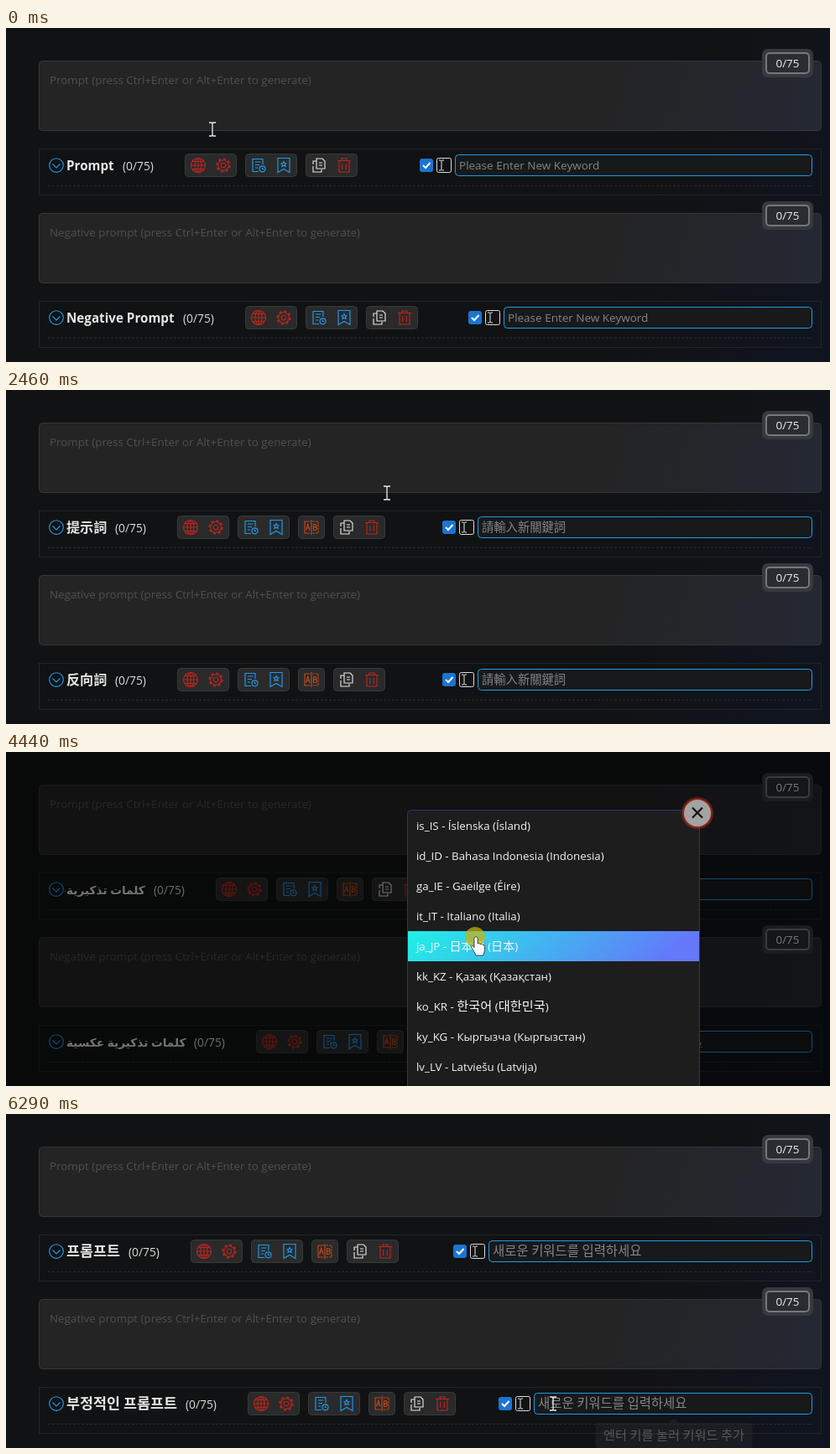
Animation of 982 by 399 pixels, one loop 6.79 s. Source, as an HTML page:

```html
<!DOCTYPE html>
<html lang="en">
<head>
<meta charset="utf-8">
<style>
  html, body { margin: 0; height: 100%; overflow: hidden; background: #111213; }
  svg { display: block; width: 982px; height: 399px; }
  text { font-family: "Open Sans", "Noto Sans", "Noto Sans CJK SC", "DejaVu Sans", sans-serif; white-space: pre; }
  .line { fill: none; stroke: currentColor; stroke-width: 1.15; }
  .red { color: #bd251d; }
  .blue { color: #1e9bea; }
  .orange { color: #c0471c; }
  .white { color: #e4e4e4; }
</style>
</head>
<body>
<svg viewBox="0 0 982 399">
  <defs>
    <linearGradient id="glow" gradientUnits="userSpaceOnUse" x1="770" y1="150" x2="1000" y2="235">
      <stop offset="0" stop-color="#0c1a40" stop-opacity="0"/>
      <stop offset="1" stop-color="#0c1a40" stop-opacity=".27"/>
    </linearGradient>
    <linearGradient id="field" gradientUnits="userSpaceOnUse" x1="720" y1="0" x2="972" y2="60">
      <stop offset="0" stop-color="#242424"/>
      <stop offset="1" stop-color="#242832"/>
    </linearGradient>
    <linearGradient id="active" gradientUnits="userSpaceOnUse" x1="570" y1="-85" x2="735" y2="85">
      <stop offset="0" stop-color="#20f0e6"/>
      <stop offset="1" stop-color="#6478fa"/>
    </linearGradient>
    <radialGradient id="halo">
      <stop offset=".8" stop-color="#c02a18" stop-opacity=".9"/>
      <stop offset="1" stop-color="#c02a18" stop-opacity="0"/>
    </radialGradient>
    <g id="globe" class="line">
      <circle r="8.5"/><ellipse rx="4" ry="8.5"/>
      <path d="M-8.5 0H8.5M0-8.5V8.5M-7.2-4.5H7.2M-7.2 4.5H7.2"/>
    </g>
    <g id="gear" class="line">
      <circle r="2.8"/><circle r="6.3"/>
      <circle r="7.7" stroke-width="1.8" stroke-dasharray="3.02"/>
    </g>
    <g id="history" class="line">
      <path d="M5-1V-7.5H-7V7.5H0M-4-4H2.5M-4-.5H1M-4 3H-1M4.5 2.5V4.5H6"/>
      <circle cx="4.5" cy="4.3" r="3.5"/>
    </g>
    <g id="bookmark" class="line">
      <path d="M-7 8.5V-8.5H7V8.5L0 4.5Z"/>
      <path d="M0-4.5L1-2.5 3-2.2 1.5-.8 2 1.3 0 .2-2 1.3-1.5-.8-3-2.2-1-2.5Z"/>
    </g>
    <g id="compare" class="line">
      <path d="M-1.5-7H-8V7H-1.5M0-9V9"/>
      <path d="M1.5-7H8V7H1.5" stroke-dasharray="2.5 1"/>
      <path d="M-6.5 3.5L-4.3-3.5-2 3.5M-5.7 1H-2.8M2.5-3.5V3.5H4.5A1.8 1.8 0 0 0 4.5-.2H2.5M4.3-.2A1.6 1.6 0 0 0 4.3-3.5H2.5"/>
    </g>
    <g id="copy" class="line">
      <path d="M-3-8H4L7-5V4H-3ZM-3-5H-7V-1M-7 1V8H3V5M0-3H4M0 0H4"/>
    </g>
    <g id="trash" class="line">
      <path d="M-8-5.5H8M-3-5.5V-8H3V-5.5M-6-5.5V8H6V-5.5M-2.3-2V5M2.3-2V5"/>
    </g>
    <path id="beam" d="M-4-8H-1L0-7 1-8H4M0-7V7M-4 8H-1L0 7 1 8H4" fill="none" stroke="#eee" stroke-width="1.3"/>
    <path id="hand" d="M-2 1Q0-2 2 1V8Q3.5 6.5 5 8.5 7 7.5 8 9.5 10.5 8.5 10.5 11V15Q10.5 18 8.5 22H0Q-1 18.5-4.5 14-6.5 11-4.5 10.5-3 10.5-2 12.5Z" fill="#fff" stroke="#222" stroke-width=".8"/>
  </defs>
  <rect width="982" height="399" fill="#111213"/>
  <rect width="982" height="399" fill="url(#glow)"/>
  <g id="scene"></g>
</svg>
<script>
const LOOP = 6790, STEP = 70, ROW = 36, TOP = 70;

const locales = `zh_CN - 简体中文 (中国)|zh_HK - 繁體中文 (中國香港)|zh_TW - 繁体中文 (中國台灣)
en_US - English (US)|af_ZA - Afrikaans (South Africa)|sq_AL - Shqip (Shqipëria)|am_ET - አማርኛ (ኢትዮጵያ)
ar_SA - العربية (السعودية)|hy_AM - Հայերեն (Հայաստան)|az_AZ - Azərbaycan (Azərbaycan)
bs_BA - Bosanski (Bosna i Hercegovina)|bg_BG - Български (България)|ca_ES - Català (Espanya)
hr_HR - Hrvatski (Hrvatska)|cs_CZ - Čeština (Česko)|da_DK - Dansk (Danmark)|nl_NL - Nederlands (Nederland)
et_EE - Eesti (Eesti)|fi_FI - Suomi (Suomi)|fr_FR - Français (France)|de_DE - Deutsch (Deutschland)
el_GR - Ελληνικά (Ελλάδα)|hu_HU - Magyar (Magyarország)|is_IS - Íslenska (Ísland)
id_ID - Bahasa Indonesia (Indonesia)|ga_IE - Gaeilge (Éire)|it_IT - Italiano (Italia)|ja_JP - 日本語 (日本)
kk_KZ - Қазақ (Қазақстан)|ko_KR - 한국어 (대한민국)|ky_KG - Кыргызча (Кыргызстан)|lv_LV - Latviešu (Latvija)
lt_LT - Lietuvių (Lietuva)|mk_MK - Македонски (Македонија)`.split(/[|\n]/);
const indexOf = code => locales.findIndex(name => name.startsWith(code));
const FAR = indexOf('ja_JP') - 4;

// bars: left edge of the two toolbars; tip: width of the language tooltip
const ui = {
  en_US: { titles: ['Prompt', 'Negative Prompt'], hint: 'Please Enter New Keyword', bars: [213, 285], tip: 166 },
  zh_CN: { titles: ['提示词', '反向词'], hint: '请输入新关键词', bars: [204, 204], tip: 182 },
  zh_HK: { titles: ['提示詞', '反向詞'], hint: '請輸入新關鍵詞', bars: [204, 204], tip: 210 },
  ar_SA: { titles: ['كلمات تذكيرية', 'كلمات تذكيرية عكسية'], hint: 'يرجى إدخال كلمة مفتاحية جديدة', bars: [250, 298], tip: 190, titleSize: 13 },
  ja_JP: { titles: ['プロンプト', 'ネガティブなプロンプト'], hint: '新しいキーワードを入力してください', bars: [236, 332], tip: 168 },
  ko_KR: { titles: ['프롬프트', '부정적인 프롬프트'], hint: '새로운 키워드를 입력하세요', bars: [220, 288] }
};

// each visit: press the globe, walk to a list entry, click it, rest
const visits = [
  { press: 340, pick: 620, done: 1120, from: 'en_US', to: 'zh_CN', globe: [229, 160], x: 560, rest: [400, 122], scroll: [0, 0] },
  { press: 1620, pick: 1960, done: 2460, from: 'zh_CN', to: 'zh_HK', globe: [230, 154], x: 560, rest: [454, 123], scroll: [0, 0] },
  { press: 2960, pick: 3170, done: 3670, from: 'zh_HK', to: 'ar_SA', globe: [222, 160], x: 560, rest: [420, 122], scroll: [0, 0] },
  { press: 4170, pick: 4440, done: 4940, from: 'ar_SA', to: 'ja_JP', globe: [267, 163], x: 560, rest: [440, 122], scroll: [0, FAR] },
  { press: 5440, pick: 5790, done: 6290, from: 'ja_JP', to: 'ko_KR', globe: [256, 168], x: 560, rest: [652, 346], scroll: [FAR, FAR] }
];

const mix = (a, b, p) => a + (b - a) * p;
const at = (x, y, body) => `<g transform="translate(${x} ${y})">${body}</g>`;
const icon = (id, x, y, tone = '') => `<use href="#${id}" x="${x}" y="${y}" class="${tone}"/>`;
const box = (x, y, w, h, fill, stroke = 'none', r = 4, more = '') =>
  `<rect x="${x}" y="${y}" width="${w}" height="${h}" rx="${r}" fill="${fill}" stroke="${stroke}" ${more}/>`;

// other scripts are set slightly larger than Latin
const scaled = s => s
  .replace(/[\u3040-\u30ff\u4e00-\u9fff]+/g, '<tspan font-size="1.06em">$&</tspan>')
  .replace(/[\u0600-\u06ff]+( [\u0600-\u06ff]+)*/g, '<tspan font-size="1.055em">$&</tspan>')
  .replace(/[\uac00-\ud7af]+/g, '<tspan font-size="1.145em">$&</tspan>');
const text = (x, y, s, fill, size = 13.4, more = '') =>
  `<text x="${x}" y="${y}" fill="${fill}" font-size="${size}" ${more}>${scaled(s)}</text>`;

function toolbar(x, english) {
  const group = (dx, ...icons) => box(x + dx + .5, 150.5, icons.length * 30 + 1, 27, '#2a2a2b', '#38393a') +
    icons.map(([id, tone], i) => icon(id, x + dx + 16 + i * 30, 164, tone)).join('');
  return group(0, ['globe', 'red'], ['gear', 'red']) +
    group(72, ['history', 'blue'], ['bookmark', 'blue']) +
    (english ? '' : group(144, ['compare', 'orange'])) +
    group(english ? 144 : 186, ['copy', 'white'], ['trash', 'red']);
}

function panel(code, i) {
  const { titles, hint, bars, titleSize = 15.2 } = ui[code];
  const x = bars[i], english = code === 'en_US';
  const check = Math.round(356.8 + .8 * x) - (english ? 34 : 0);
  const label = ['Prompt', 'Negative prompt'][i] + ' (press Ctrl+Enter or Alt+Enter to generate)';
  return at(0, i * 182,
    box(39.5, 39.5, 932, 83, 'url(#field)', '#343639') +
    text(52, 67, label, '#505050', 13.4) +
    box(901, 25, 61, 34, '#36393e', 'none', 7) +
    box(906, 30, 51, 24, '#292c32', '#74777c', 4, 'stroke-width="2"') +
    text(931.5, 47, '0/75', '#eee', 13.4, 'text-anchor="middle"') +
    box(39.5, 144.5, 932, 55, 'none', '#222426', 0) +
    '<path d="M50 188.5H961" stroke="#292b2d" stroke-dasharray="3 2"/>' +
    '<g class="line blue"><circle cx="60" cy="164" r="8.3"/><path d="M55.5 162.5L60 167 64.5 162.5"/></g>' +
    text(72, 170, titles[i], '#e6e6e6', titleSize, 'font-weight="bold"') +
    text(x - 74, 169.5, '(0/75)', '#dcdcdc', 13.8) +
    toolbar(x, english) +
    box(check, 156, 16, 16, '#1b74d2', 'none', 3) +
    `<path d="M${check + 4} 164l3 3 5.5-6" fill="none" stroke="#fff" stroke-width="2"/>` +
    box(check + 20.5, 155.5, 17, 17, 'none', '#ddd', 2) +
    at(check + 26, 164, '<use href="#beam" transform="scale(.75)"/>') +
    box(check + 42.5, 151.5, 918 - check, 25, '#17191b', '#1b9fe6') +
    text(check + 47, 169, hint, '#858585', 13.5));
}

const bubble = (x, y, w, s, opacity = 1) => at(x, y,
  `<g opacity="${opacity}"><path d="M-6 0L0-6 6 0Z" fill="#343434"/>` +
  box(-w / 2, 0, w, 30, '#343434') + text(0, 20, s, '#f0f0f0', 13.3, 'text-anchor="middle"') + '</g>');

const languageTip = code =>
  bubble(ui[code].bars[0] + 16, 187, ui[code].tip, 'Language: ' + locales[indexOf(code)].split(' - ')[1]);

function dialog(code, scroll, [x, y]) {
  const hover = x > 478 && x < 827 ? Math.floor((y - TOP) / ROW) : -1;
  const rows = locales.slice(scroll, scroll + 10).map((name, i) => at(0, TOP + i * ROW,
    (i === hover || scroll + i === indexOf(code) ? box(479, 0, 347, ROW, 'url(#active)', 'none', 0) : '') +
    text(489, 23, name, '#f4f4f4', 13.3)));
  return '<rect width="982" height="399" fill="#000" opacity=".5"/>' +
    box(478.5, 69.5, 348, 345, '#1d1d1e', '#2c3177') + rows.join('') +
    '<circle cx="824" cy="73" r="20" fill="url(#halo)"/><circle cx="824" cy="73" r="16" fill="#a3a3a3"/>' +
    '<path d="M818 66.5l12 12m0-12l-12 12" stroke="#111" stroke-width="2.2"/>';
}

const pointer = ([x, y], kind, pressed) =>
  (pressed ? `<circle cx="${x - 1}" cy="${y}" r="12" fill="#c9b012" opacity=".72"/>` : '') + icon(kind, x, y);

const page = code => panel(code, 0) + panel(code, 1);

function scene(t) {
  const visit = visits.findLast(v => t >= v.press);
  if (!visit) {
    const p = t < 60 ? 0 : (Math.floor((t - 60) / STEP) + 1) / 5;
    const spot = [mix(246, 229, p), mix(121, 160, p)], over = spot[1] >= 150;
    return page('en_US') + (over ? languageTip('en_US') : '') + pointer(spot, over ? 'hand' : 'beam');
  }
  const { press, pick, done, from, to, globe, x, rest, scroll } = visit;
  if (t >= done) {
    const tip = to === 'ko_KR' ? bubble(796, 369, 187, '엔터 키를 눌러 키워드 추가', .3) : '';
    return page(to) + tip + pointer(rest, 'beam');
  }
  const steps = Math.round((pick - press) / STEP);
  const p = t >= pick ? 1 : Math.floor((t - press) / (pick - press) * steps) / steps;
  if (p === 0) return page(from) + languageTip(from) + pointer(globe, 'hand', true);
  const y = TOP + (indexOf(to) - scroll[1]) * ROW + 7;
  const spot = [mix(globe[0], x, p), mix(globe[1], y, p)];
  return page(from) + dialog(from, Math.round(mix(...scroll, p)), spot) + pointer(spot, 'hand', p === 1);
}

const stage = document.getElementById('scene');
let shown = '';
function frame() {
  const markup = scene(performance.now() % LOOP);
  if (markup !== shown) stage.innerHTML = shown = markup;
  requestAnimationFrame(frame);
}
frame();
</script>
</body>
</html>
```
